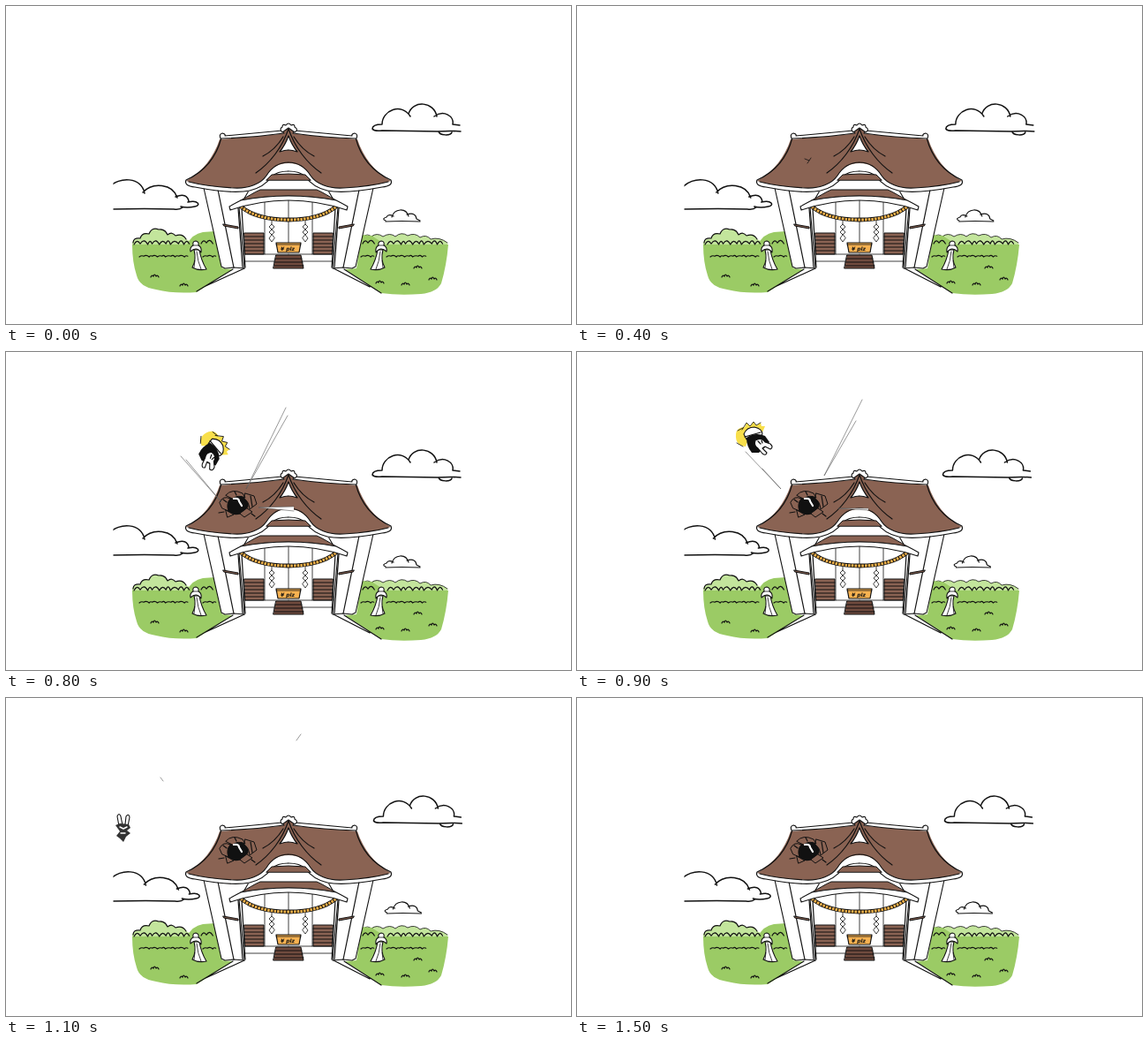
These frames come from a looping animation (640 px wide and 360 px high, 1600 ms). An HTML page:

```html
<!DOCTYPE html>
<html lang="en">
<head>
<meta charset="utf-8">
<title>Shrine roof</title>
<style>
html, body { margin: 0; width: 100%; height: 100%; overflow: hidden; background: #fff; }
svg { display: block; width: 640px; height: 360px; }
path, ellipse { stroke-linecap: round; stroke-linejoin: round; }
.l { fill: none; stroke: #111; stroke-width: 1.2; }
.t { fill: none; stroke: #111; stroke-width: .8; }
.w { fill: #fff; stroke: #111; stroke-width: 1.1; }
.b { fill: #8a6353; stroke: #111; stroke-width: 1; }
.f { fill: #8a6353; }
.g { fill: #9bcb65; }
.h { fill: #c3e59c; }
.y { fill: #f8df4b; }
.k { fill: #111; }
.s { fill: #fff; stroke: #555; stroke-width: .6; }
.m { font: italic 700 6px "DejaVu Sans", sans-serif; fill: #111; }
</style>
</head>
<body>
<svg viewBox="0 0 640 360">
<defs>
  <clipPath id="edge"><path d="M121.5 0H519V360H121.5Z"/></clipPath>

  <g id="lantern">
    <path class="w" d="M213 276Q216 287 211 296Q218 300 227 298Q221 288 219 276Z"/>
    <path class="t" d="M216 278Q217 289 221 298M214 288L213 296"/>
    <path class="w" d="M209 278Q208 273 212 271Q211 266 215 266Q219 267 218 271Q222 273 221 279Q218 275 215 275Q212 275 209 278Z"/>
    <path class="t" d="M212 271H218"/>
  </g>

  <g id="walls">
    <path class="w" d="M224 206L244 295L248 297L258 296L270 297L264 228L275 209Z"/>
    <path class="l" d="M240 208L258 296M263 229L268 296M267 229L271 296"/>
    <path class="b" d="M246 247L263 250V252L247 249Z"/>
    <path class="b" d="M270 257H292V281H271Z"/>
    <path class="l" d="M270 261H292M270 265H292M270 269H292M270 273H292M270 277H292"/>
    <path class="t" d="M293 222V281M270 281H320M271 289H305"/>
    <path class="t" d="M301 242V247L298 250L301 253L304 250L301 247M301 253L298 256L301 259L304 256L301 253M301 259L298 263L301 267L304 263Z"/>
  </g>

  <g id="roof">
    <path fill="#fff" d="M204 198C203 202 207 204 214 205C235 209 262 211 274 210L320 209V178L290 185Z"/>
    <path class="f" d="M242 151C262 149 290 147 310 145L320 138V178C308 178 300 184 295 192C289 201 275 207 258 206C240 205 220 203 204 198C222 188 235 172 242 151Z"/>
    <path class="l" d="M244 149C238 172 224 188 204 197C202 202 206 204 214 205C235 209 262 212 276 209C289 206 296 200 301 193C306 188 313 187 320 187"/>
    <path class="l" d="M320 177C308 177 300 184 295 192C289 201 275 207 258 206C240 205 222 203 207 199"/>
    <path class="w" d="M243 150Q241 145 245 144Q249 145 248 147L313 141L315 144Q280 149 243 150Z"/>
    <path class="l" d="M320 139C313 160 299 178 283 189M314 148C306 161 299 166 291 170"/>
    <path fill="#fff" d="M320 147Q316 158 310 165Q316 163 320 163Z"/>
    <path class="l" d="M320 147Q316 158 310 165Q316 163 320 163"/>
  </g>

  <g id="hole">
    <ellipse class="k" cx="262" cy="173" rx="13" ry="11" transform="rotate(-18 262 173)"/>
    <path class="b" d="M242 170Q246 162 254 166Q249 172 252 180L245 177ZM249 162Q256 154 268 160L271 165Q263 161 257 166ZM271 160L281 163L284 172L276 178Q275 169 270 166ZM273 177L279 181L270 187L265 183ZM249 179L258 184L251 187Z"/>
    <path class="l" d="M246 167L250 170M259 158L261 162M277 163L279 175M241 182L247 181M278 183L282 186"/>
    <path d="M258 166Q264 165 264 169L267 174" fill="none" stroke="#fff" stroke-width="2.2"/>
  </g>
</defs>

<!-- garden -->
<path class="h" d="M143 271Q142 263 152 263Q154 256 162 258Q165 250 173 253Q180 252 183 259Q188 255 192 260Q200 257 204 264L212 268V280H145Z"/>
<path class="l" d="M144 268Q144 262 152 263Q154 256 162 258Q165 250 173 253Q180 252 183 259Q188 255 192 260Q200 257 204 264"/>
<path class="g" d="M143 270H205Q211 258 223 256L237 255L245 297L257 298L216 324Q190 326 170 321Q151 318 148 305Q143 290 143 270Z"/>
<path class="h" d="M410 262Q420 256 427 261Q435 256 441 261Q448 255 455 260Q463 256 469 262Q476 258 481 264Q491 261 500 268V280H410Z"/>
<path class="t" d="M405 261Q409 257 414 261Q420 256 427 261Q435 256 441 261Q448 255 455 260Q463 256 469 262Q476 258 481 264Q491 261 500 268"/>
<path class="g" d="M403 259L414 260L430 270H501Q499 294 493 314Q488 324 470 326Q445 328 425 325L384 298L397 297Z"/>
<g id="hedges"></g>
<g id="tufts"></g>
<path class="l" d="M257 298L216 323M270 297L224 318M383 298L425 325M371 297L412 318"/>

<!-- hall -->
<path fill="#fff" d="M262 215H378L372 297H269Z"/>
<use href="#walls"/>
<use href="#walls" transform="translate(640) scale(-1 1)"/>
<path class="t" d="M320 220V268"/>
<path d="M306 282H334L337 297H303Z" fill="#704b3e" stroke="#111"/>
<path class="l" d="M305 286H335M304 290H336M304 294H337"/>
<path d="M266 227Q284 242 320 242Q356 242 374 227" fill="none" stroke="#111" stroke-width="4.8"/>
<path d="M266 227Q284 242 320 242Q356 242 374 227" fill="none" stroke="#f2b24a" stroke-width="3" style="stroke-linecap:butt" stroke-dasharray="2.6 1.1"/>
<path d="M306 268H334L332 279H308Z" fill="#f7b251" stroke="#111" stroke-width="1.2"/>
<path class="t" d="M306 270H334"/>
<text class="m" x="311" y="277">¥ plz</text>

<!-- roofs -->
<use href="#roof"/>
<use href="#roof" transform="translate(640) scale(-1 1)"/>
<path class="w" d="M313 143Q309 139 313 137Q313 133 317 135Q320 131 323 135Q327 133 327 137Q332 140 327 143L320 138Z"/>
<path class="b" d="M295 197L301 191Q320 189 339 191L345 197Z"/>
<path class="b" d="M266 220C275 215 281 211 288 208H352C359 211 365 215 374 220Q320 210 266 220Z"/>
<path class="w" d="M253 227Q260 223 266 220Q320 210 374 220Q380 223 387 227L386 231Q320 209 254 231Z"/>
<use href="#lantern"/>
<use href="#lantern" transform="translate(640) scale(-1 1)"/>

<g clip-path="url(#edge)">
<g id="clouds" class="l" style="stroke-width:1.5">
  <path d="M426 134Q415 134 415 139Q417 142 426 141L489 142Q506 141 515 142M426 134C426 118 448 109 458 125M456 122C461 106 485 108 488 125M485 125C496 117 508 125 506 134L514 135M490 142C491 147 504 147 505 143"/>
  <path style="stroke-width:1.2" d="M430 244Q447 243 469 244M430 243Q425 241 431 239Q433 235 439 238M437 239C440 229 453 228 456 238M454 236Q464 233 465 241L469 243"/>
  <path d="M117 205C128 193 153 193 157 212M155 211C166 199 189 201 194 217M192 216Q205 211 207 221M206 222C218 219 221 226 214 227Q205 229 198 227M117 230Q160 229 190 230Q197 231 200 228"/>
</g>
</g>

<path id="crack" class="t" d="M-4 -2L1 0L3 -3M1 0L-1 3"/>
<g id="burst">
  <path class="b" d="M251 178L249 170L256 171L258 165L266 166L270 171L272 183L264 180L257 187Z"/>
  <path class="l" d="M257 172L264 178L270 173M264 178L261 185M252 166L257 170"/>
</g>
<use id="pit" href="#hole"/>
<g id="rays"></g>

<g clip-path="url(#edge)">
  <g id="tumble">
    <path class="y" d="M-9 9Q-21 8 -20 -5Q-19 -13 -10 -13L-8 -18L-4 -14L0 -19L3 -15L8 -18L9 -14L13 -14L10 -7L-4 -4Z"/>
    <path class="t" d="M-13 -10L-8 -18L-4 -14L0 -19L3 -15L8 -18M-19 5L-12 9M-18 -9L-12 -12"/>
    <path class="w" d="M-11 -5Q-8 -13 1 -13Q10 -11 10 -5L3 3L-8 1Z"/>
    <path class="k" d="M-8 -1Q2 -8 13 -3L18 4L13 10L6 16L-2 16Q-8 9 -8 -1Z"/>
    <path class="w" d="M2 2Q9 -2 13 4L19 6Q23 10 19 12L13 9L10 11L15 16Q14 20 10 17L5 11Q0 8 2 2Z"/>
    <path class="l" d="M5 3L8 6M9 2L10 5M-10 -2L8 -7M-4 5L-1 12"/>
  </g>
  <g id="fall">
    <path class="w" d="M-5 -3L-7 -14Q-5 -19 -3 -14L-1 -4L2 -5L3 -14Q6 -18 7 -13L5 -3Z"/>
    <path d="M-9 -4L-4 -6L6 -5L8 -1L4 2L8 5L3 9L0 15L-4 11L-8 8L-4 3Z" fill="#333"/>
    <path d="M-4 -2L0 0L4 -2M-3 5H2" stroke="#fff" stroke-width="1.4" fill="none"/>
  </g>
</g>
</svg>
<script>
const $ = id => document.getElementById(id);
const STEP = 100, COUNT = 16;

// Each ray by step: far corner, near tip, far corner; the far side stays open
const RAYS = {
  6: ["227 164L256 187L258 172", "277 126L262 172L298 133", "286 170L270 176L285 183"],
  7: ["213 133L252 181L222 134", "305 86L264 168L313 94", "311 171L276 176L311 181"],
  8: ["198 118L244 170L204 122", "317 63L272 155L319 72", "326 175L286 176L326 180"],
  9: ["191 113L231 155L210 132", "323 54L280 140L316 78", "330 177L296 177L330 179"],
  10: ["181 98L192 112L184 102", "330 46L318 68L328 52"],
  11: ["175 90L178 94", "334 41L329 48"]
};

const line = (d, cls) => `<path class="${cls}" d="${d}"/>`;

// A row of uneven scallops from x0 to x1
function scallops(x0, x1, y, size, lift) {
  let d = `M${x0} ${y}`;
  for (let x = x0, i = 0; x < x1; i++) {
    const w = size * (1 + .3 * Math.sin(i * 2.3));
    d += `q${w / 2} ${-lift} ${w} ${i % 2 ? .8 : -.8}`;
    x += w;
  }
  return line(d, "l");
}

$("hedges").innerHTML =
  scallops(145, 202, 270, 7, 7) + scallops(221, 231, 269, 6, 6) +
  scallops(404, 411, 269, 6, 6) + scallops(432, 490, 270, 7, 7) +
  scallops(151, 205, 284, 5, 2) + scallops(223, 236, 284, 5, 2) +
  scallops(402, 414, 284, 5, 2) + scallops(431, 474, 284, 5, 2);

$("tufts").innerHTML = [[168, 307], [201, 317], [466, 297], [452, 316], [483, 310], [423, 314]]
  .map(([x, y]) => line(`M${x - 4} ${y}q1 -3 3 -1q1 -4 3 0q2 -2 3 1`, "l")).join("");

const show = (id, on) => { $(id).style.display = on ? "" : "none"; };
const move = (id, x, y, rest = "") => $(id).setAttribute("transform", `translate(${x} ${y}) ${rest}`);

function pose(n) {
  const drift = 1.4 - 2 * Math.cos((n - 1) * Math.PI / 4);
  move("clouds", drift.toFixed(2), 0);

  show("crack", n === 4 || n === 5);
  move("crack", 262, 175, `scale(${n === 5 ? 2 : 1})`);
  show("burst", n === 6);
  show("pit", n > 6);
  $("rays").innerHTML = (RAYS[n] || []).map(d => line("M" + d, "s")).join("");

  // Thrown in an arc with its top at step 9
  const k = n - 9, x = 200 - 33.5 * k, y = 98 + 12.5 * k * k;
  show("tumble", n >= 7 && n <= 9);
  show("fall", n === 10 || n === 11);
  move("tumble", x, y, `rotate(${-65 * k})`);
  move("fall", x, y, `rotate(${(11 - n) * 65})`);
}

let last = -1;
function tick() {
  const n = Math.floor(performance.now() / STEP) % COUNT;
  if (n !== last) pose(last = n);
  requestAnimationFrame(tick);
}
tick();
</script>
</body>
</html>
```
